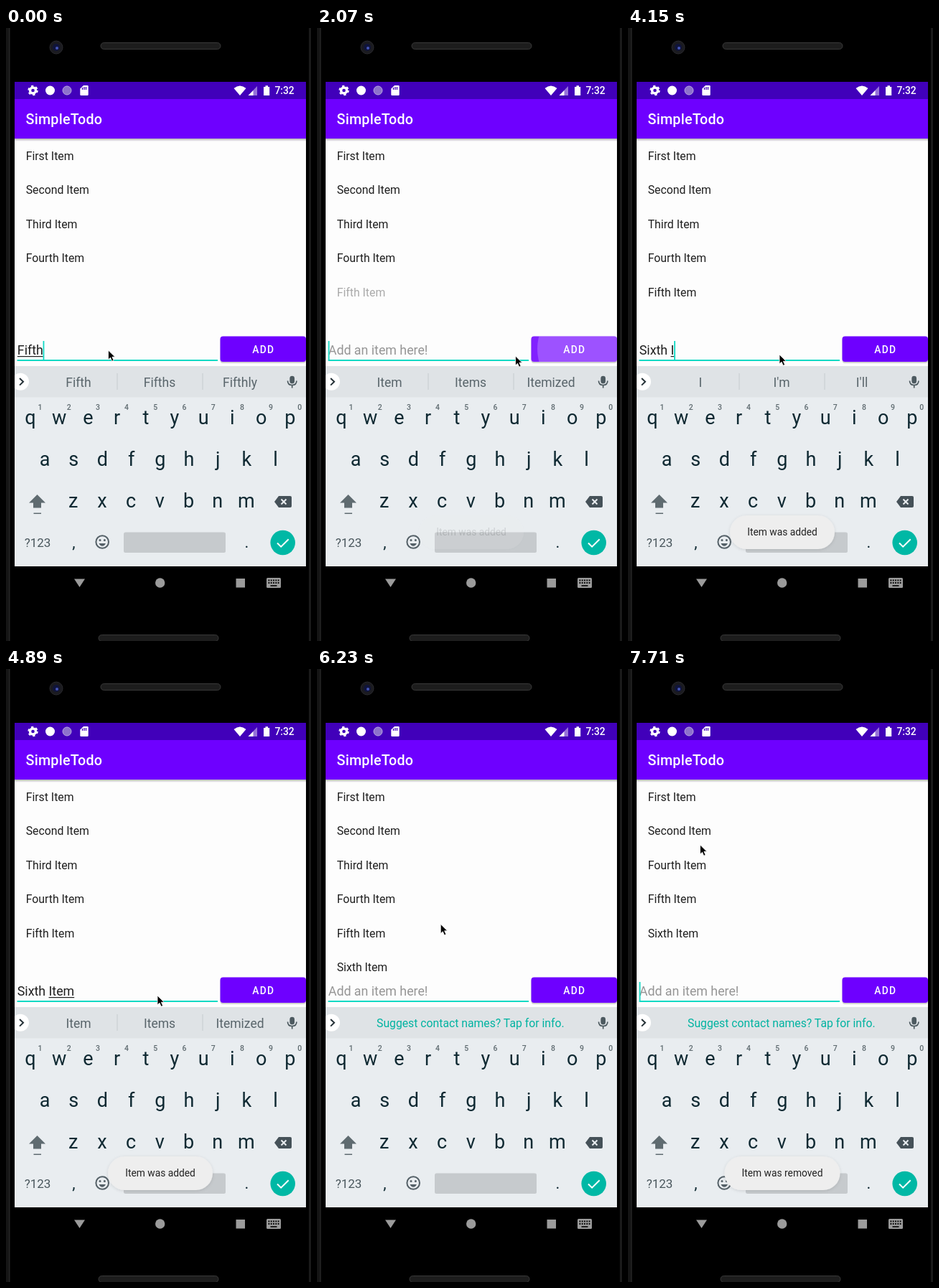
Animation of 425x854 px, one loop 8000 ms. Source, as an HTML page:

```html
<!DOCTYPE html>
<html lang="en">
<head>
<meta charset="utf-8">
<title>Todo list</title>
<style>
  html, body { margin: 0; width: 100%; height: 100%; overflow: hidden; background: #000; }
  svg { display: block; width: 425px; height: 854px; font-family: Roboto, sans-serif; }
  text { white-space: pre; }
  .mid { text-anchor: middle; }
  .item { font-size: 15.8px; fill: #1f1f1f; }
  .field { font-size: 17.8px; }
  .key { font-size: 27px; fill: #0f2932; }
  .digit { font-size: 10.5px; font-weight: 500; fill: #5f6b70; }
  .hint { font-size: 17.5px; fill: #59656b; }
</style>
</head>
<body>
<svg viewBox="0 0 425 854">
  <defs>
    <clipPath id="buttonClip"><rect x="298.5" y="429.5" width="119.5" height="35.5" rx="4"/></clipPath>
    <clipPath id="screenClip"><rect x="12" y="75" width="406" height="675"/></clipPath>
    <clipPath id="listClip"><rect x="12" y="154" width="406" height="276"/></clipPath>
    <linearGradient id="shade" x2="0" y2="1">
      <stop stop-color="#000" stop-opacity=".3"/><stop offset="1" stop-color="#000" stop-opacity="0"/>
    </linearGradient>
    <filter id="soft" x="-20%" y="-40%" width="140%" height="190%">
      <feDropShadow dx="0" dy="1" stdDeviation="2" flood-opacity=".12"/>
    </filter>
  </defs>

  <!-- device -->
  <rect width="425" height="854" fill="#000"/>
  <rect width="4" height="854" fill="#151515"/>
  <rect x="4" width="1.5" height="854" fill="#262626"/>
  <rect x="422" width="3" height="854" fill="#1a1a1a"/>
  <circle cx="70" cy="27" r="9" fill="#1b1b20" stroke="#2b2b2f"/>
  <circle cx="70" cy="27" r="5" fill="#10143a"/>
  <circle cx="71" cy="28" r="2" fill="#4656b8"/>
  <g fill="#1d1d1d" stroke="#393939">
    <rect x="132" y="20.5" width="167" height="9" rx="4.5"/>
    <rect x="129" y="845.5" width="167" height="9" rx="4.5"/>
  </g>

  <g clip-path="url(#screenClip)">
    <rect x="12" y="75" width="406" height="675" fill="#fdfdfd"/>
    <g id="list" clip-path="url(#listClip)"></g>
    <rect x="12" y="154" width="406" height="4" fill="url(#shade)"/>
    <rect x="12" y="75" width="406" height="24" fill="#4100ba"/>
    <rect x="12" y="99" width="406" height="55" fill="#6e00ff"/>
    <text x="27.5" y="134" font-size="19.7" font-weight="500" letter-spacing=".25" fill="#fff">SimpleTodo</text>

    <!-- status icons -->
    <g fill="#fff">
      <circle cx="37.5" cy="87" r="4" fill="none" stroke="#fff" stroke-width="3.4"/>
      <circle cx="37.5" cy="87" r="6.2" fill="none" stroke="#fff" stroke-width="2" stroke-dasharray="3.2 3.29"/>
      <circle cx="61.5" cy="87" r="6.5"/>
      <circle cx="85" cy="87" r="6" fill="#8d72cc" stroke="#b9a8e2"/>
      <path d="M108 80h5.500q1.200 0 1.200 1.200v11.600q0 1.200-1.200 1.200h-9q-1.200 0-1.200-1.200V84.500z"/>
      <path d="M106.500 83v3M109 82v4M111.500 82v4" stroke="#4100ba" stroke-width="1.300"/>
      <path d="M317.500 84Q326 77 334.500 84L326 94z"/>
      <path d="M337.500 94L350 81V94z" opacity=".45"/><path d="M337.500 94L344.500 87V94z"/>
      <path d="M359 82h2.500v-1.700h3.500V82h2.200v12H359z"/>
      <text x="374.500" y="92" font-size="13.800" font-weight="500">7:32</text>
    </g>

    <!-- entry field -->
    <text id="prompt" class="field" x="15.800" y="455.300" fill="#959595">Add an item here!</text>
    <text id="entry" class="field" x="15.800" y="455.300" fill="#1f1f1f"></text>
    <rect id="underline" y="457" height="1.200" fill="#1f1f1f"/>
    <rect x="15.500" y="462" width="279.500" height="2" fill="#10d9c4"/>
    <rect id="caret" y="436" width="1.800" height="26" fill="#10d9c4"/>

    <!-- button -->
    <rect x="298.500" y="431" width="119.500" height="36" rx="4" fill="#000" opacity=".18"/>
    <g clip-path="url(#buttonClip)">
      <rect x="298" y="429" width="120" height="37" fill="#6e00ff"/>
      <rect id="pressed" x="298" y="429" width="120" height="37" fill="#fff"/>
      <circle id="ripple" cy="447" fill="#fff"/>
    </g>
    <text x="343.300" y="452.500" font-size="13.800" font-weight="500" letter-spacing="1.230" fill="#fff">ADD</text>

    <!-- keyboard -->
    <rect x="12" y="471" width="406" height="279" fill="#e9edf0"/>
    <rect x="12" y="471" width="406" height="43.500" fill="#dfe3e6"/>
    <circle cx="20" cy="492.700" r="12" fill="#fff"/>
    <path d="M19 488l5 4.800-5 4.800" fill="none" stroke="#263238" stroke-width="2"/>
    <path id="dividers" d="M155 481v23M274 481v23" stroke="#c6cbce"/>
    <g id="hints" class="mid"></g>
    <g fill="none" stroke="#4d5a60" stroke-width="1.700">
      <rect x="396.200" y="485.500" width="5" height="9" rx="2.500" fill="#4d5a60"/>
      <path d="M392.500 491.500q0 6 6.200 6t6.200-6M398.700 497.500v4"/>
    </g>
    <g id="keys" class="mid"></g>
    <path d="M43.500 650L55 661.500h-6v7H38v-7h-6zM38.500 675.500h10.500v1.400H38.500z" fill="#5f6b70"/>
    <path d="M380 652h16q2 0 2 2v12q0 2-2 2h-16l-6-8z" fill="#455158"/>
    <path d="M383.500 656.500l7 7M390.500 656.500l-7 7" stroke="#e9edf0" stroke-width="2"/>
    <text class="mid" x="44" y="723" font-size="17" fill="#4a575d">?123</text>
    <text class="mid key" x="94.500" y="724" style="font-size:22px">,</text>
    <text class="mid key" x="335.500" y="724" style="font-size:22px">.</text>
    <g fill="#546067">
      <circle cx="134.200" cy="716" r="8.800" fill="none" stroke="#546067" stroke-width="2"/>
      <circle cx="131" cy="713.500" r="1.500"/><circle cx="137.400" cy="713.500" r="1.500"/>
      <path d="M129.500 718h9.400q-1.500 3.700-4.700 3.700t-4.700-3.700z"/>
    </g>
    <rect x="164" y="702.500" width="142" height="28.500" rx="2.500" fill="#c6cacd"/>
    <circle cx="385.700" cy="717" r="17.300" fill="#00b8a5"/>
    <path d="M378 717.500l5.200 5.200 10.500-10.500" fill="none" stroke="#fff" stroke-width="2"/>
    <g id="toast">
      <rect id="toastBox" y="679" height="47" rx="23.500" fill="#eee" filter="url(#soft)"/>
      <text id="toastText" class="mid" x="215" y="707" font-size="13.800" fill="#222"></text>
    </g>
  </g>

  <!-- navigation -->
  <g fill="#9b9b9b">
    <path d="M95 767.500h15l-7.500 11.500z"/>
    <circle cx="214.700" cy="773" r="6.700"/>
    <rect x="320.500" y="767" width="12.500" height="12.500"/>
    <rect x="363" y="766" width="20" height="14" rx="1.500"/>
    <path d="M365.500 769.500h15M365.500 773h15" stroke="#000" stroke-width="1.800" stroke-dasharray="1.800 1.500"/>
    <path d="M368.500 777h9" stroke="#000" stroke-width="1.600"/>
  </g>

  <path id="pointer" d="M0 0v13l3-2.800 2.200 5 2.400-1-2.200-4.900h4z" fill="#000" stroke="#fff" stroke-width=".8"/>
</svg>
<script>
const LOOP = 8000, TICK = 148.2;
const $ = id => document.getElementById(id);
const set = (el, attrs) => { for (const k in attrs) el.setAttribute(k, attrs[k]); };
const clamp = v => Math.max(0, Math.min(1, v));
const ramp = (t, start, length) => clamp((t - start) / length);
const latest = (list, t) => list.filter(e => e[0] <= t).pop();

const typed = [
  [0, 'Fifth'], [100, 'Fifth '], [400, 'Fifth I'], [550, 'Fifth It'], [700, 'Fifth Item'],
  [2000, ''], [2780, 'S'], [2930, 'Si'], [3070, 'Six'], [3520, 'Sixth'], [3660, 'Sixth '],
  [4110, 'Sixth I'], [4250, 'Sixth It'], [4380, 'Sixth Item'], [5500, '']
];
const itemHints = 'Item Items Itemized';
const hints = [
  [0, 'Fifth Fifths Fifthly'], [100, 'of and grade'], [400, "I I'm I'll"], [550, "It It's Its"],
  [700, itemHints], [2200, "I The I'm"], [2780, 'S So Something'], [2930, 'Si Since Six'],
  [3070, 'Six Sir Sixth'], [3520, 'Sixth Sixths Sixty'], [3660, 'grade and of'],
  [4110, "I I'm I'll"], [4250, "It It's Its"], [4380, itemHints], [5500, '']
];
// pointer stops: tick, x, y
const route = [
  [0, 142.5, 449], [8, 142.5, 449], [12, 365, 447], [13, 372, 447], [14, 276.5, 457],
  [18, 211, 455], [33, 211, 455], [36, 330, 449], [37, 335, 449], [38, 272, 461],
  [40, 248, 455], [44, 96.5, 256], [48, 96.5, 256], [50, 100.5, 245], [60, 100.5, 245]
];
// down: press time, x: ripple centre, base and wave: overlay strengths
const presses = [
  { down: 1850, x: 375, base: .13, wave: .22 },
  { down: 5420, x: 335, base: .08, wave: .15 }
];
const names = ['First', 'Second', 'Third', 'Fourth', 'Fifth', 'Sixth'];
const born = { Fifth: 2030, Sixth: 5500 };

$('list').innerHTML = names.map(n => `<text class="item" x="27.7">${n} Item</text>`).join('');
const rows = [...$('list').children];
$('hints').innerHTML = [101, 214, 326].map(x => `<text class="hint" x="${x}" y="499.500"></text>`).join('') +
  '<text x="213.800" y="499" font-size="15.750" fill="#00b3a1">Suggest contact names? Tap for info.</text>';
const [hintA, hintB, hintC, notice] = $('hints').children;
$('keys').innerHTML = [['qwertyuiop', 34, 552], ['asdfghjkl', 54, 610], ['zxcvbnm', 93.7, 668]]
  .map(([row, x0, y], r) => [...row].map((c, i) => {
    const x = x0 + i * 40.2;
    const digit = r ? '' : `<text class="digit" x="${x + 13.5}" y="532">${(i + 1) % 10}</text>`;
    return `<text class="key" x="${x}" y="${y}">${c}</text>${digit}`;
  }).join('')).join('');

const ruler = document.createElement('canvas').getContext('2d');
const widthOf = s => { ruler.font = '17.8px Roboto, sans-serif'; return ruler.measureText(s).width; };

function drawField(t) {
  const [since, text] = latest(typed, t);
  const wordStart = text.lastIndexOf(' ') + 1;
  const left = widthOf(text.slice(0, wordStart)), end = widthOf(text);
  $('entry').textContent = text;
  set($('prompt'), { opacity: text ? 0 : 1 });
  set($('underline'), { x: 15.8 + left, width: end - left });
  set($('caret'), { x: 15.6 + end, opacity: Math.floor((t - since) / 500) % 2 ? 0 : 1 });

  const words = latest(hints, t)[1].split(' ');
  [hintA, hintB, hintC].forEach((el, i) => { el.textContent = words[i] || ''; });
  set(notice, { opacity: words[0] ? 0 : 1 });
  set($('dividers'), { opacity: words[0] ? 1 : 0 });
}

function drawList(t) {
  const p = ramp(t, 7155, 250), lift = (1 - Math.cos(Math.PI * p)) / 2;
  rows.forEach((row, i) => {
    const name = names[i];
    let opacity = born[name] ? ramp(t, born[name], 120) : 1;
    if (name === 'Third') opacity = 1 - ramp(t, 7035, 120);
    set(row, { y: 184 + 47.4 * (i - (i > 2 ? lift : 0)), opacity });
  });
}

function drawButton(t) {
  const press = presses.find(p => t >= p.down && t < p.down + 480);
  const age = press ? t - press.down : 0;
  const fade = press ? clamp((480 - age) / 200) : 0;
  set($('pressed'), { opacity: press ? press.base * fade : 0 });
  set($('ripple'), {
    cx: press ? press.x : 0, r: 68 * Math.min(1, age / 220), opacity: press ? press.wave * fade : 0
  });
}

function drawToast(t) {
  const removed = t > 7000;
  const enter = 1 - (1 - ramp(t, removed ? 7060 : 2040, 500)) ** 2;
  const leave = removed ? 0 : ramp(t, 5500, 500) ** 1.5;
  const width = removed ? 161 : 146;
  $('toastText').textContent = removed ? 'Item was removed' : 'Item was added';
  set($('toastBox'), { x: 215 - width / 2, width });
  set($('toast'), { opacity: enter * (1 - leave) });
}

function drawPointer(tick) {
  const i = route.findIndex(stop => stop[0] > tick);
  const [a, ax, ay] = route[i - 1], [b, bx, by] = route[i];
  const p = (tick - a) / (b - a);
  set($('pointer'), { transform: `translate(${ax + (bx - ax) * p} ${ay + (by - ay) * p})` });
}

function render(ms) {
  const tick = Math.floor((ms % LOOP + 6) / TICK), t = tick * TICK;
  drawField(t);
  drawList(t);
  drawButton(t);
  drawToast(t);
  drawPointer(tick);
}

const start = performance.now();
function frame() {
  render(performance.now() - start);
  requestAnimationFrame(frame);
}
frame();
</script>
</body>
</html>
```
